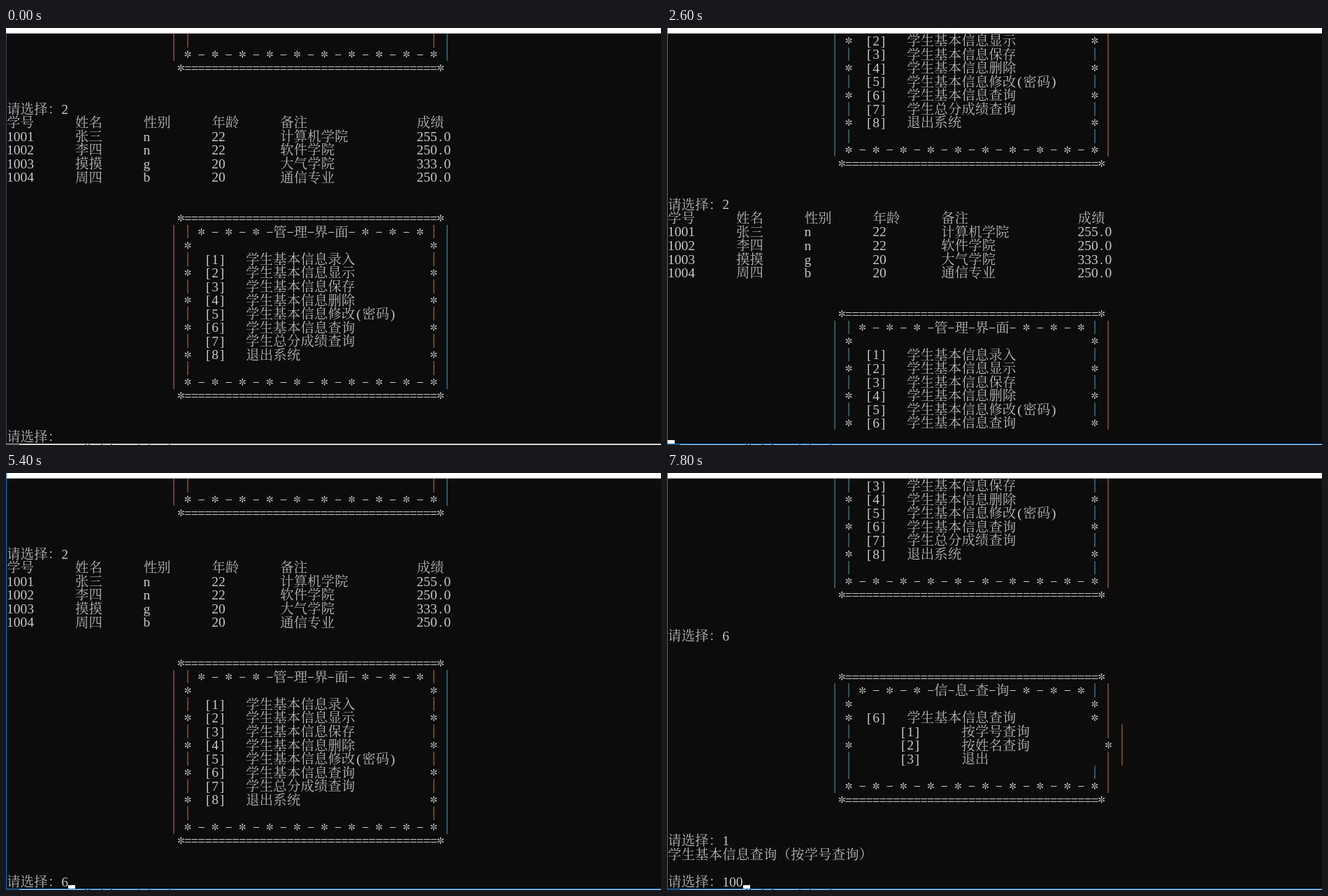
An HTML page with a canvas that plays this animation: 937 by 597 pixels, repeating every 8 s.

```html
<!DOCTYPE html>
<html lang="zh-CN">
<head>
<meta charset="utf-8">
<style>
  html, body { margin: 0; width: 100%; height: 100%; overflow: hidden; background: #0c0c0c; }
  canvas { display: block; }
</style>
</head>
<body>
<canvas id="stage" width="937" height="597"></canvas>
<script>
const ctx = document.getElementById('stage').getContext('2d');
const W = 937, H = 597, LOOP = 8000;
const CELL = 9.775, ROW = 19.55, LEFT = 1, TOP = 8.2, ROWS = 30;
const INK = '#c8c8c8', HAN_INK = '#bababa';
const LATIN = '19.55px "Liberation Serif", serif';
const HAN = '300 19.3px "Noto Serif CJK SC", "Noto Sans CJK SC", "Noto Sans CJK", sans-serif';

// A line is a flat list: column, text, column, text...
const rule = [25, '*' + '='.repeat(37) + '*'];
const edge = (mark, ...inner) => [24, '|', 26, mark, ...inner, 62, mark, 64, '|'];
const title = text => edge('|', 28, '* - * - * -' + [...text].join('-') + '- * - * - *');
const item = (n, text) => edge(n % 2 ? '|' : '*', 29, `[${n}]`, 35, text);
const subItem = (n, text) =>
  [24, '|', 26, n % 2 ? '|' : '*', 34, `[${n}]`, 43, text, 64, n % 2 ? '|' : '*', 66, '|'];
const record = (...cells) => cells.flatMap((text, i) => [[0, 10, 20, 30, 40, 60][i], text]);
const prompt = typed => [0, '请选择：' + typed];

const gap = [[], []];
const foot = [edge('|'), [24, '|', 26, '* - '.repeat(9) + '*', 64, '|'], rule];
const options = ['学生基本信息录入', '学生基本信息显示', '学生基本信息保存', '学生基本信息删除',
  '学生基本信息修改(密码)', '学生基本信息查询', '学生总分成绩查询', '退出系统'];
const menu = [rule, title('管理界面'), edge('*'), ...options.map((s, i) => item(i + 1, s)), ...foot];
const subMenu = [rule, title('信息查询'), edge('*'), item(6, options[5]),
  ...['按学号查询', '按姓名查询', '退出'].map((s, i) => subItem(i + 1, s)), ...foot];
const table = [
  record('学号', '姓名', '性别', '年龄', '备注', '成绩'),
  record('1001', '张三', 'n', '22', '计算机学院', '255.0'),
  record('1002', '李四', 'n', '22', '软件学院', '250.0'),
  record('1003', '摸摸', 'g', '20', '大气学院', '333.0'),
  record('1004', '周四', 'b', '20', '通信专业', '250.0')
];

const listed = [...menu, ...gap, prompt('2'), ...table, ...gap];
const home = typed => [...listed, ...menu, ...gap, prompt(typed)];
const printing = () => [...listed, ...menu.slice(0, 9), []];
const search = typed => [...menu, ...gap, prompt('6'), ...gap, ...subMenu, ...gap, prompt(typed)];
const byNumber = typed => [...search('1'), [0, '学生基本信息查询（按学号查询）'], [], prompt(typed)];

// start time, screen, typed text, cursor column (-1 is hidden)
const steps = [
  [0, home, '', -1], [300, home, '', 8], [800, home, '', -1], [1300, home, '', 8],
  [1800, home, '', -1], [2300, home, '', 8], [2400, home, '2', 9],
  [2600, printing, '', 0], [2700, home, '', 8], [3200, home, '', -1],
  [3700, home, '', 8], [4200, home, '', -1], [4700, home, '', 8],
  [5200, home, '', -1], [5400, home, '6', 9], [5500, search, '', 8],
  [6100, search, '', -1], [6300, search, '1', 9], [6600, search, '1', -1],
  [6800, byNumber, '', 8], [7600, byNumber, '1', 9], [7700, byNumber, '10', 10],
  [7800, byNumber, '100', 11]
];

function fill(color, x, y, w, h) {
  ctx.fillStyle = color;
  ctx.fillRect(x, y, w, h);
}

// six arms with slightly swollen ends
function star(x, y) {
  ctx.fillStyle = INK;
  ctx.beginPath();
  for (let i = 0; i < 6; i++) {
    const a = Math.PI / 2 + i * Math.PI / 3;
    const dx = Math.cos(a) * 4.2, dy = Math.sin(a) * 4.2;
    ctx.moveTo(x, y);
    ctx.lineTo(x + dx - dy * 0.24, y + dy + dx * 0.24);
    ctx.lineTo(x + dx * 1.2, y + dy * 1.2);
    ctx.lineTo(x + dx + dy * 0.24, y + dy - dx * 0.24);
  }
  ctx.fill();
}

// subpixel-smoothed stroke: a cool pixel beside a warm one
function bar(x, row) {
  const top = Math.round(TOP + row * ROW);
  const h = Math.round(TOP + (row + 1) * ROW) - top;
  fill('#1c5468', Math.round(x) - 1, top, 1, h);
  fill('#7a4324', Math.round(x), top, 1, h);
}

function glyph(ch, col, row) {
  const wide = ch.charCodeAt(0) > 255;
  const x = LEFT + (col + (wide ? 1 : 0.5)) * CELL;
  const y = TOP + (row + 0.5) * ROW;
  const mid = Math.round(y);
  if (ch === '|') {
    bar(x, row);
  } else if (ch === '*') {
    star(x, y);
  } else if (ch === '-') {
    fill(INK, x - 4.2, mid, 8.4, 1);
  } else if (ch === '=') {
    fill(INK, x - 4.4, mid - 2, 8.8, 1);
    fill(INK, x - 4.4, mid + 2, 8.8, 1);
  } else if (ch !== ' ') {
    ctx.fillStyle = wide ? HAN_INK : INK;
    ctx.font = wide ? HAN : LATIN;
    ctx.fillText(ch, x, y + (wide ? 7.1 : 6.8));
  }
  return wide ? 2 : 1;
}

function drawLine(line, row) {
  for (let i = 0; i < line.length; i += 2) {
    let col = line[i];
    for (const ch of line[i + 1]) col += glyph(ch, col, row);
  }
}

function drawFrame(active) {
  fill('#ffffff', 0, 0, W, 7);
  fill('#cccccc', 0, 7, W, 1);
  fill(active ? '#1a78cc' : '#444c56', 0, active ? 0 : 8, 1, H);
  fill(active ? '#1a78cc' : '#c8c2c2', 0, 595, W, 1);
  fill(active ? '#b4c6d6' : '#e4e0e0', 0, 596, W, 1);
  fill('#303030', 0, 596, 19, 1);
  // tips of the text hidden behind the window
  for (const x of [113, 118, 136, 150]) fill('#333333', x, 596, 2, 1);
  for (const x of [189, 204, 233]) fill('#5a3fa0', x, 596, 2, 1);
}

function draw([start, screen, typed, cursor]) {
  fill('#0c0c0c', 0, 0, W, H);
  ctx.textAlign = 'center';
  ctx.textBaseline = 'alphabetic';
  screen(typed).slice(-ROWS).forEach(drawLine);
  drawFrame(start >= 300);
  if (cursor >= 0) fill('#ffffff', Math.round(LEFT + cursor * CELL), 590, 10, 5);
}

let shown;
function tick() {
  const t = performance.now() % LOOP;
  const step = steps.findLast(s => s[0] <= t);
  if (step !== shown) draw(shown = step);
  requestAnimationFrame(tick);
}
tick();
</script>
</body>
</html>
```
